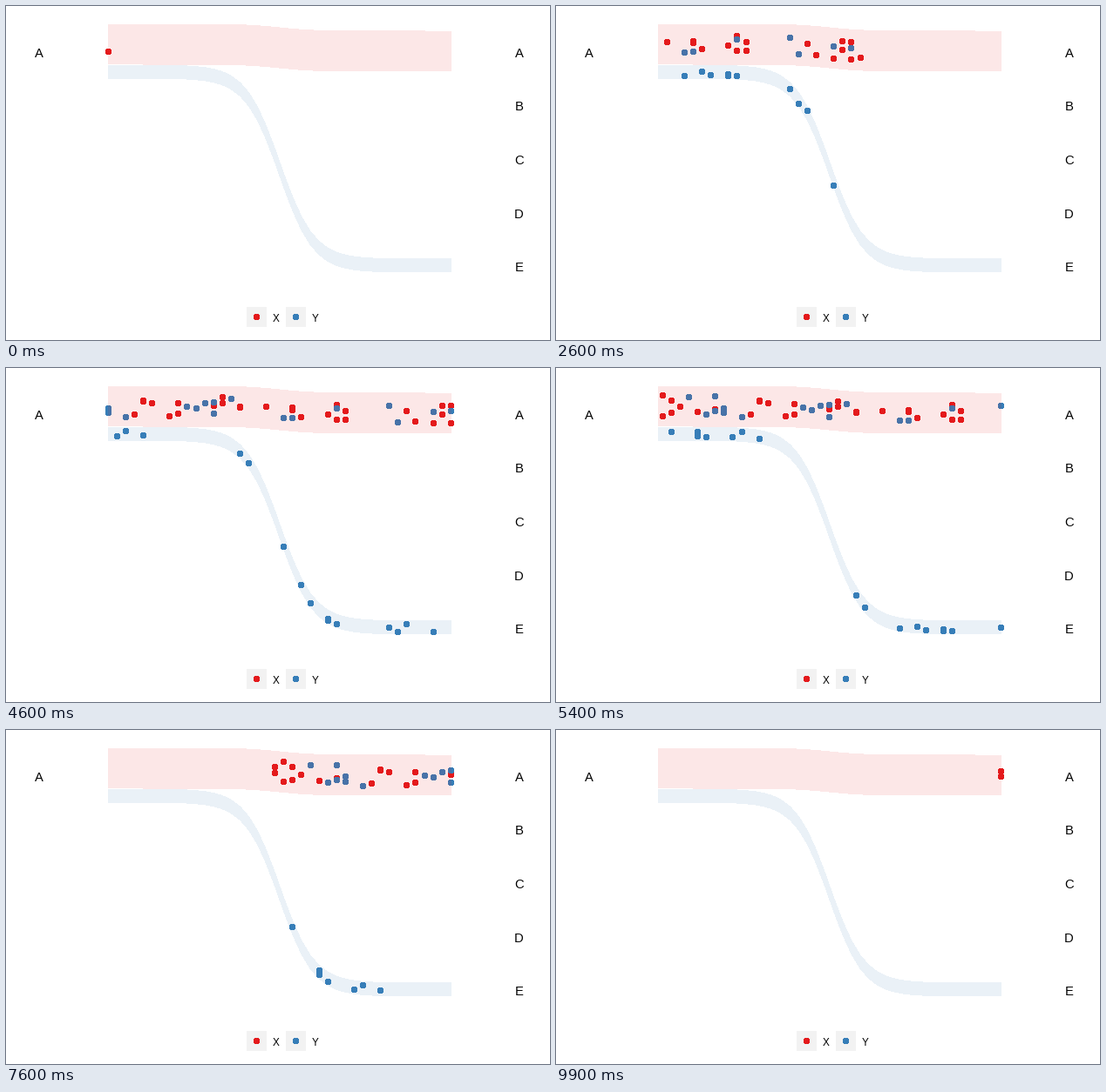
A matplotlib script that plays this animation: 624x384 px, repeating every 10 s.

```python
import numpy as np
import matplotlib.pyplot as plt
from matplotlib.animation import FuncAnimation
from matplotlib.collections import PolyCollection

W, H, DPI = 624, 384, 96
FRAMES, INTERVAL = 100, 100
RED, BLUE = "#e41a1c", "#377eb8"
STEPS, LAST_TICK = 39, 87

plt.rcParams["font.family"] = "Liberation Sans"

# Start tick -> height(s) at which dots enter each ribbon
X_TO_A = {
    0: [52], 1: [35, 55], 2: [35, 45], 3: [55], 5: [53], 6: [41],
    13: [41.3, 51.3], 14: [33.8, 51.3], 15: [45.4], 18: [49.3],
    19: [39.8, 42.4], 22: [41], 25: [43.2, 44], 27: [33.1, 39.3],
    28: [42.9], 32: [39.8, 52], 33: [54.6], 35: [39.9], 36: [37.2, 38],
    37: [53], 41: [47.2], 43: [50.3], 45: [44.3], 46: [36.7, 51.3],
    47: [31, 54.9], 48: [38.6, 45.2],
}
Y_TO_A = {
    1: [41.5], 3: [41.6], 7: [54], 8: [35], 14: [38.3], 19: [51.9],
    20: [52.6], 26: [34.9], 28: [38.4, 52], 29: [39.6], 30: [46.3],
    31: [43.6], 38: [55.9], 40: [45.6, 50.7], 41: [31.9, 48.8],
    42: [52.8], 44: [33],
}
Y_TO_E = {
    3: [79.8], 6: [71.3], 7: [80], 8: [75], 14: [79], 15: [77.7, 79.4],
    17: [78.9], 18: [74.9], 20: [79.5], 24: [77.6], 25: [77.8], 36: [77],
    38: [71.7], 39: [77.7], 42: [78.4], 43: [72.7, 78], 46: [73.4],
}

u = np.linspace(0, 1, STEPS + 1)
path_x = 117.3 + 393 * u
rise = 1 / (1 + np.exp(-20 * (u - 0.5)))

# Every tick falls on a whole frame; frames between ticks are interpolated
ticks = np.arange(LAST_TICK + 1)
tick_frames = np.round(ticks * (FRAMES - 1) / LAST_TICK)

dots = [
    (start, y, drop, color)
    for lanes, drop, color in ((X_TO_A, 8, RED), (Y_TO_A, 8, BLUE), (Y_TO_E, 223, BLUE))
    for start, ys in lanes.items()
    for y in ys
]
starts, heights, drops = (np.array(c, float) for c in list(zip(*dots))[:3])

angle = np.linspace(0, 2 * np.pi, 32, endpoint=False)
disc = 3.5 * np.column_stack([np.cos(angle), np.sin(angle)])


def discs(xs, ys):
    """Round outlines centred on whole pixels."""
    centers = np.column_stack([np.floor(xs), np.round(ys)]) + 0.5
    return centers[:, None, :] + disc


def dot_shapes(frame):
    tick = np.interp(frame, tick_frames, ticks)
    step = tick - starts
    shown = (step >= 0) & (np.floor(tick) - starts <= STEPS)
    k = np.arange(STEPS + 1)
    xs = np.interp(step, k, path_x)
    ys = heights + drops * np.interp(step, k, rise)
    return discs(np.where(shown, xs, -50), ys)


def ribbon(top, bottom, drop, color):
    xs = np.concatenate([path_x, path_x[::-1]])
    ys = np.concatenate([top + drop * rise, bottom + drop * rise[::-1]])
    ax.fill(xs, ys, color=color, alpha=0.1, lw=0, zorder=3, antialiased=False)


def label(x, y, text, size=11.04, ha="center"):
    ax.text(x, y, text, fontsize=size, ha=ha, va="baseline", color="black")


fig = plt.figure(figsize=(W / DPI, H / DPI), dpi=DPI, facecolor="white")
ax = fig.add_axes([0, 0, 1, 1])
ax.set(xlim=(0, W), ylim=(H, 0))
ax.axis("off")

ribbon(21, 67, 8, RED)
ribbon(68, 83, 223, BLUE)

label(37.5, 59, "A")
for i, name in enumerate("ABCDE"):
    label(588.5, 59 + 61.5 * i, name)

for x, name, color in ((276, "X", RED), (321, "Y", BLUE)):
    ax.add_patch(plt.Rectangle((x, 346), 23, 23, fc="#f2f2f2", lw=0))
    ax.add_collection(PolyCollection(
        discs(np.array([x + 11.8]), np.array([357])),
        facecolors=color, linewidths=0, antialiased=False, zorder=2))
    label(x + 29.7, 363, name, 8.8, "left")

points = PolyCollection(dot_shapes(0), facecolors=[d[3] for d in dots],
                        linewidths=0, antialiased=False, zorder=2)
ax.add_collection(points, autolim=False)


def update(frame):
    points.set_verts(dot_shapes(frame))
    return (points,)


anim = FuncAnimation(fig, update, frames=FRAMES, interval=INTERVAL,
                     repeat=True, repeat_delay=0, blit=False)
plt.show()
```
